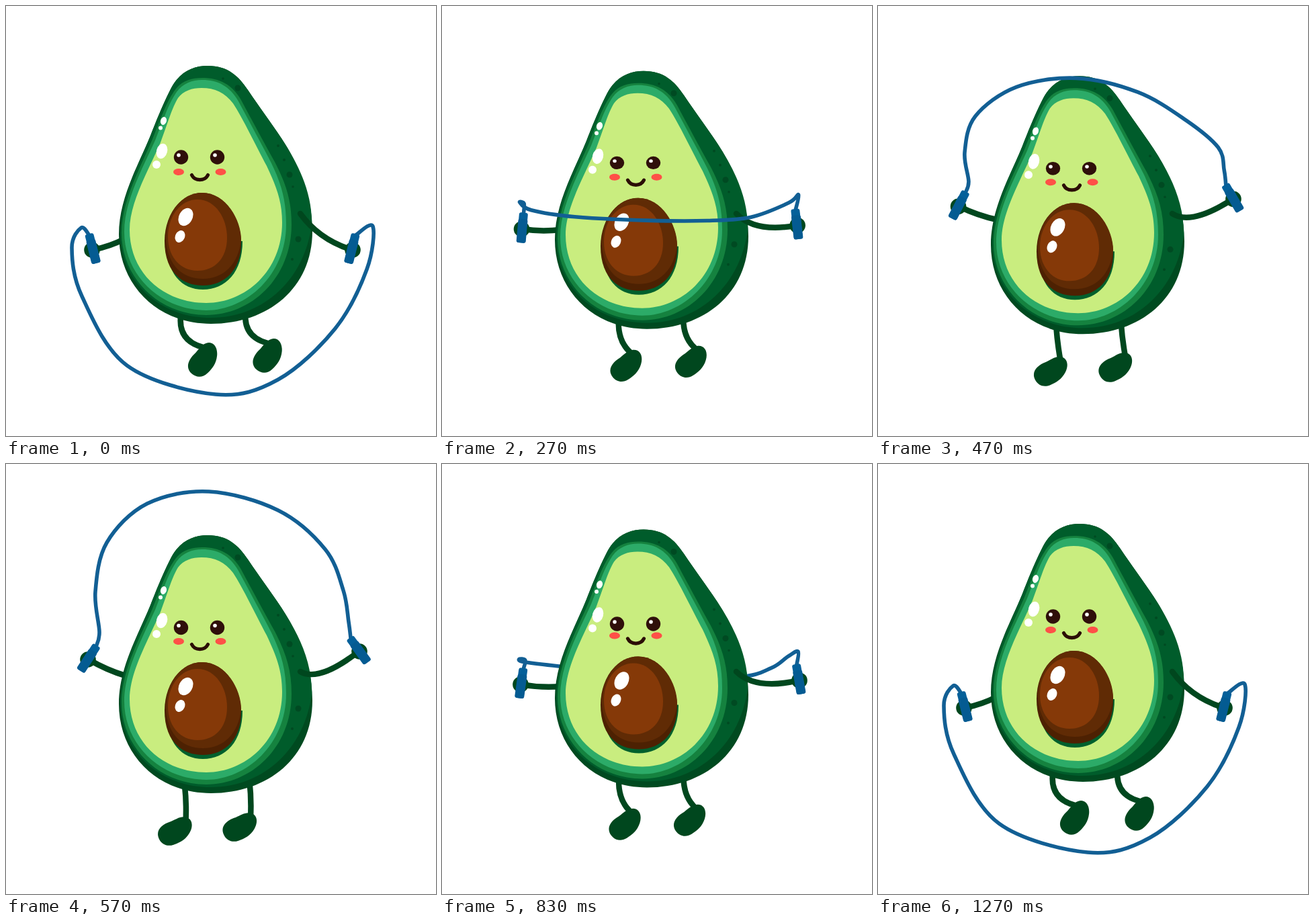
Animation of 640 by 640 pixels, one loop 1330 ms. Source, as an HTML page:

```html
<!DOCTYPE html>
<html lang="en">
<head>
<meta charset="utf-8">
<title>Avocado skipping rope</title>
<style>
html, body { margin: 0; height: 100%; overflow: hidden; background: #fff; }
svg { display: block; width: 100vw; height: 100vh; }
.line { fill: none; stroke-linecap: round; stroke-linejoin: round; }
.limb { stroke: #00471e; stroke-width: 8.5; }
.rope { stroke: #125f94; stroke-width: 5.6; }
</style>
</head>
<body>
<svg viewBox="0 0 640 640">
  <defs>
    <g id="leg">
      <path id="shin" class="line limb"/>
      <path id="foot" fill="#00471e" d="M-19 0C-19-14-6-18 8-16C16-16 24-17 30-13C39-7 36 4 26 11C16 18 6 18-3 17C-13 16-19 9-19 0Z"/>
    </g>
    <g id="eye">
      <circle r="10.7" fill="#2f0f0a"/>
      <circle cx="-3.5" cy="-3" r="2.8" fill="#fff"/>
    </g>
    <g id="handle">
      <rect x="-6.5" y="-22.5" width="13" height="45" rx="3" fill="#04609a"/>
      <rect x="-7" y="-13" width="14" height="35.5" rx="3" fill="#045b92"/>
    </g>
  </defs>

  <use href="#leg"/>
  <use href="#leg" x="96.5" y="-6"/>
  <path id="armL" class="line limb"/>
  <path id="ropeBack" class="line rope"/>

  <g id="body">
    <path fill="#004a20" d="M300 89C330 89 346 104 360 125C378 152 392 170 410 197C437 238 456 285 456 335C456 420 390 473 305 473C225 473 168 415 168 340C168 285 198 235 215 193C228 160 237 139 247 120C260 97 280 89 300 89Z"/>
    <path fill="#005c2b" d="M300 89C330 89 346 104 360 125C378 152 392 170 410 197C437 238 456 280 455 325C445 405 385 464 305 464C228 464 170 410 170 338C170 285 198 235 215 193C228 160 237 139 247 120C260 97 280 89 300 89Z"/>
    <path fill="#15823f" d="M292 107C318 107 337 117 350 140C365 168 385 205 400 232C417 265 425 290 425 325C425 405 365 460 298 460C228 460 172 405 172 338C172 290 200 240 218 198C232 163 238 145 250 127C260 112 275 107 292 107Z"/>
    <path fill="#2cab68" d="M292 110C315 110 333 119 346 142C361 170 380 205 395 234C410 265 417 290 417 325C417 400 358 453 298 453C232 453 176 402 176 336C176 290 204 240 222 200C236 165 241 148 252 131C261 116 276 110 292 110Z"/>
    <path fill="#c9ed7f" d="M291 122C311 122 326 129 338 145C353 168 372 208 388 238C402 268 411 290 411 322C411 395 356 442 298 442C235 442 184 398 184 333C184 292 212 245 230 203C243 168 247 152 256 137C264 126 277 122 291 122Z"/>
    <g fill="#004a22">
      <circle cx="345" cy="122" r="4.5"/><circle cx="323" cy="108" r="1.8"/>
      <circle cx="405" cy="208" r="2"/><circle cx="414" cy="229" r="2"/>
      <circle cx="422" cy="251" r="4.5"/><circle cx="427" cy="269" r="1.8"/>
      <circle cx="435" cy="347" r="4.5"/><circle cx="426" cy="377" r="2"/>
    </g>
    <path fill="#00602d" d="M238 345C238 400 262 422 293 422C327 422 352 396 352 350Z"/>
    <path fill="#4d2102" d="M292 278C327 278 350 318 350 353C350 392 326 416 293 416C258 416 236 392 236 350C236 312 259 278 292 278Z"/>
    <path fill="#602b05" d="M292 278C327 278 350 318 350 348C346 384 324 406 293 406C262 406 240 386 238 346C238 312 259 278 292 278Z"/>
    <path fill="#853908" d="M285 288C312 288 329 316 329 345C329 375 311 394 285 394C259 394 241 373 241 343C241 314 259 288 285 288Z"/>
    <g fill="#fff">
      <ellipse rx="10" ry="14" transform="translate(267.5 314) rotate(28)"/>
      <ellipse rx="7" ry="9.3" transform="translate(259 343) rotate(25)"/>
      <ellipse rx="8" ry="11.5" transform="translate(232 216) rotate(15)"/>
      <circle cx="224" cy="236" r="6"/>
      <ellipse rx="4.4" ry="6" transform="translate(234.5 171) rotate(18)"/>
      <circle cx="230" cy="181.5" r="3"/>
    </g>
    <ellipse cx="257" cy="247" rx="8" ry="5" fill="#ff5047"/>
    <ellipse cx="319.5" cy="247" rx="8" ry="5" fill="#ff5047"/>
    <path class="line" stroke="#2b0d06" stroke-width="5.2" d="M276.5 251.5C281 261 296 261 300.5 251.5"/>
    <use id="eyeL" href="#eye"/>
    <use id="eyeR" href="#eye"/>
  </g>

  <path id="armR" class="line limb"/>
  <circle id="handL" r="11.8" fill="#00471e"/>
  <circle id="handR" r="11.8" fill="#00471e"/>
  <path id="ropeFront" class="line rope"/>
  <use id="gripL" href="#handle"/>
  <use id="gripR" href="#handle"/>
</svg>

<script>
const LOOP = 1330;
const times = [0, 170, 370, 570, 830, 1030, 1270];
const eyeDrop = [0, 0, 1.5, 1.5, 4.5, 5.5, 2];

// body drop, leg stretch, then x, y, angle of the left and right handle
const poses = [
  [0, 0, 129, 361, -14, 515, 361, 14],
  [3.5, .27, 122.5, 348, -5.5, 523, 346, 5],
  [12, .64, 118, 311, 17, 531, 302, -19],
  [17, 1, 123, 289, 33, 525, 277, -36],
  [8.5, .5, 118, 326, 8, 531, 320, -10],
  [1, .14, 127, 358, -13, 518, 357, 13]
];
// x, y of the points along the rope between the handles
const ropes = [
  [112, 330, 98, 360, 113, 432, 180, 535, 312, 578, 405, 556, 490, 480, 537, 392, 546, 328],
  [117, 308, 109, 320, 128, 360, 195, 401, 320, 418, 415, 410, 480, 383, 520, 335, 537, 301],
  [128, 280, 122, 262, 137, 243, 200, 227, 290, 223, 375, 232, 445, 246, 513, 252, 524, 262],
  [139, 250, 133, 190, 150, 117, 210, 59, 302, 41, 405, 69, 475, 127, 502, 188, 510, 235],
  [124, 292, 115, 290, 122, 294, 174, 300, 315, 312, 440, 316, 490, 303, 515, 286, 530, 279],
  [113, 323, 103, 350, 113, 406, 180, 485, 315, 518, 410, 500, 485, 445, 530, 370, 544, 321]
];
poses.push(poses[0]);
ropes.push(ropes[0]);

const $ = id => document.getElementById(id);
const set = (id, name, value) => $(id).setAttribute(name, value);
const place = (id, x, y, more = '') => set(id, 'transform', `translate(${x} ${y}) ${more}`);
const bend = (id, x, y, cx, cy, ex, ey) => set(id, 'd', `M${x} ${y}Q${cx} ${cy} ${ex} ${ey}`);

// Periodic monotone cubic interpolation
function tween(values, t) {
  const n = times.length;
  const time = i => times[(i + n) % n] + Math.floor(i / n) * LOOP;
  const value = i => values[(i + n) % n];
  const slope = i => (value(i + 1) - value(i)) / (time(i + 1) - time(i));
  const tangent = i => {
    const a = slope(i - 1), b = slope(i);
    return a * b > 0 ? 2 * a * b / (a + b) : 0;
  };
  const i = times.findLastIndex(k => k <= t);
  const span = time(i + 1) - time(i), u = (t - time(i)) / span, v = 1 - u;
  return v * v * (1 + 2 * u) * value(i) + u * u * (1 + 2 * v) * value(i + 1)
    + span * u * v * (v * tangent(i) - u * tangent(i + 1));
}
const tweenRow = (rows, t) => rows[0].map((_, c) => tween(rows.map(r => r[c]), t));

// Catmull-Rom spline through [x, y] points
function spline(p) {
  const at = i => p[Math.max(0, Math.min(p.length - 1, i))];
  const control = (i, sign) => at(i).map((v, k) => v + sign * (at(i + 1)[k] - at(i - 1)[k]) / 6);
  let d = 'M' + p[0];
  for (let i = 1; i < p.length; i++) d += `C${control(i - 1, 1)} ${control(i, -1)} ${p[i]}`;
  return d;
}

function polar(x, y, length, degrees) {
  const a = degrees * Math.PI / 180;
  return [x + length * Math.cos(a), y + length * Math.sin(a)];
}

function draw(t) {
  const [drop, stretch, lx, ly, la, rx, ry, ra] = tweenRow(poses, t);

  place('body', 0, drop);
  const eyeY = 225 + tween(eyeDrop, t);
  const open = Math.max(.13, Math.min(1, Math.abs(t - 370) / 110));
  place('eyeL', 260.5, eyeY, `scale(1 ${open})`);
  place('eyeR', 314.5, eyeY, `scale(1 ${open})`);

  const footX = 289 - 44 * stretch, footY = 533 + 17 * stretch, turn = 25 * stretch - 50;
  place('foot', footX, footY, `rotate(${turn})`);
  bend('shin', 260 + 6 * stretch, 462 + drop, 256 + 13 * stretch, 503 + 3 * stretch,
    ...polar(footX, footY, 27, turn - 9));

  const shoulder = 331 + (ly - 326) * .43;
  bend('armL', lx, ly + 2, (lx + 178) / 2, (ly + shoulder) / 2 + 5, 178, shoulder);
  bend('armR', 438, 309, 466, 325 + (ry - 277) * .27, rx, ry + 2);
  place('handL', lx - 1, ly + 2);
  place('handR', rx + 1, ry + 2);
  place('gripL', lx, ly, `rotate(${la})`);
  place('gripR', rx, ry, `rotate(${ra})`);

  const flat = tweenRow(ropes, t), points = [polar(lx, ly, 20, la - 90)];
  for (let i = 0; i < flat.length; i += 2) points.push([flat[i], flat[i + 1]]);
  points.push(polar(rx, ry, 20, ra - 90));
  const path = spline(points), front = t < 560 || t > 1100;
  set('ropeFront', 'd', front ? path : '');
  set('ropeBack', 'd', front ? '' : path);
}

const start = performance.now();
function tick() {
  draw((performance.now() - start) % LOOP);
  requestAnimationFrame(tick);
}
tick();
</script>
</body>
</html>
```
